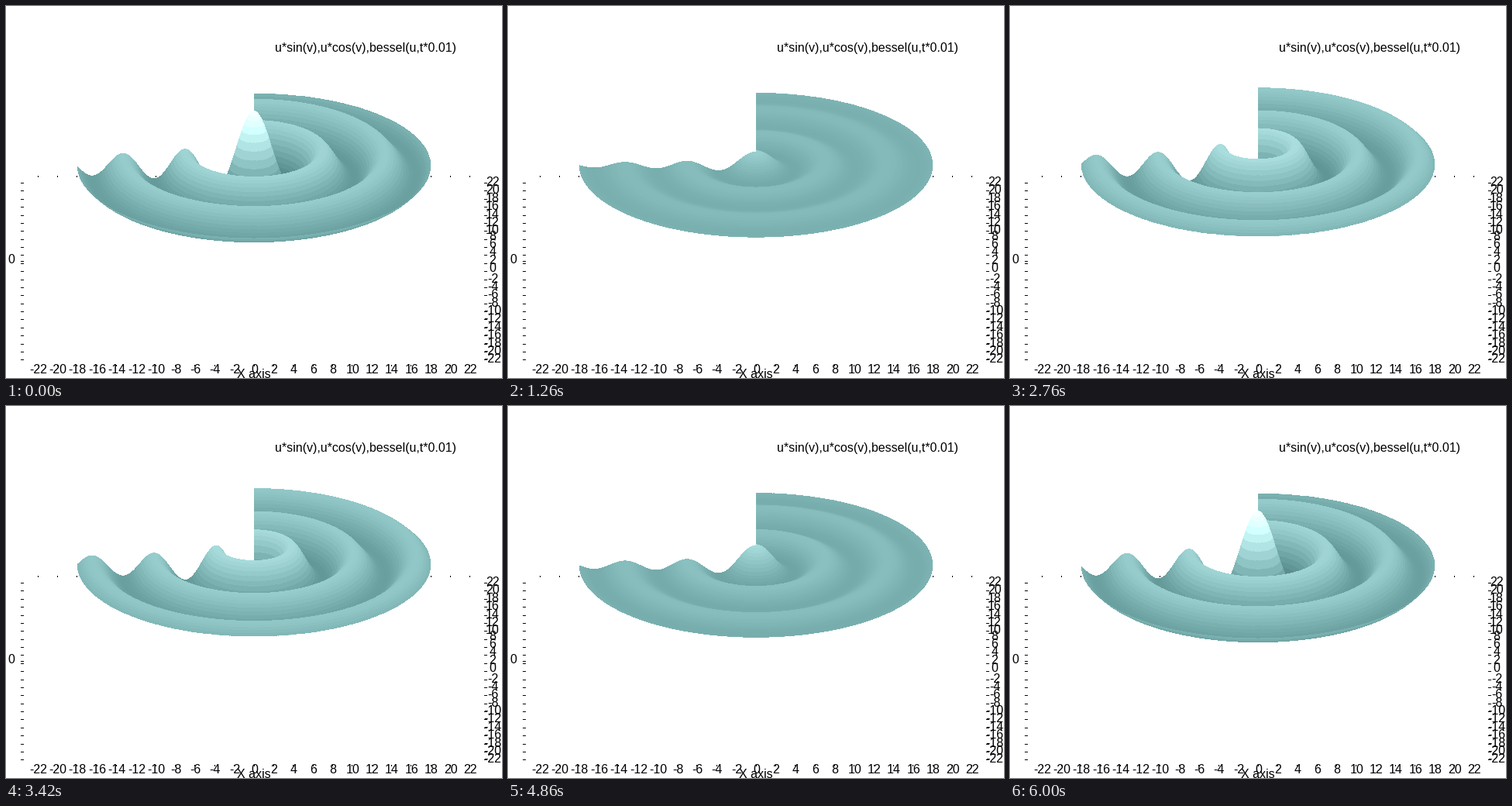
Recreate the animation shown at these times as a matplotlib script. Size 640 by 480 pixels, loop 6.06 s.

```python
import numpy as np
import matplotlib.pyplot as plt
from matplotlib.animation import FuncAnimation

W, H, DPI = 640, 480, 100
FRAMES, STEP_MS = 101, 60
CX, CY = 320, 205                # screen place of the surface's centre
SX, SY, SZ = 12.68, 5.19, 69.5   # pixels per unit along x, y and z
RADIUS, BANDS = 18, 72
FLOOR_Y = 342.2                  # screen height of y = 0 on the box floor
EDGE = 23.55                     # half width of the box
PX = 72 / DPI                    # one pixel in points

plt.rcParams["font.family"] = "Liberation Sans"
fig = plt.figure(figsize=(W / DPI, H / DPI), dpi=DPI, facecolor="white")
ax = fig.add_axes([0, 0, 1, 1])
ax.axis("off")


def bessel0(r):
    """J0 from its integral form."""
    a = (np.arange(200) + 0.5) * np.pi / 200
    return np.cos(np.multiply.outer(r, np.sin(a))).mean(axis=-1)


def label(x, y, text, ha="center"):
    ax.text(x, y, text, size=16 * PX, ha=ha, va="baseline", color="black", zorder=5)


def dash(x, y, w, h, zorder=4):
    """A small tick of w by h whole pixels, centred near (x, y)."""
    x0, y0 = np.round(x - w / 2), np.round(y) - h // 2
    ax.add_patch(plt.Rectangle((x0, y0), w, h, fc="black", lw=0,
                               antialiased=False, zorder=zorder))


# Axes
left, right = CX - SX * EDGE, CX + SX * EDGE
back, front = FLOOR_Y - SY * EDGE, FLOOR_Y + SY * EDGE
for m in range(-22, 23, 2):
    x, y = CX + SX * m, FLOOR_Y - SY * m
    dash(x, back, 1, 2, zorder=1)
    dash(x, front, 1, 2)
    dash(left, y, 4, 1)
    dash(right, y, 4, 1)
    lift = 3 if 0 <= m < 10 else 0
    label(x + 0.5, 474, str(m))
    label(628, np.round(y) + 4 - lift, str(m))
dash(left, 329, 4, 1)
label(6.5, 332, "0")
label(319.5, 480, "X axis")
label(347, 59, "u*sin(v),u*cos(v),bessel(u,t*0.01)", ha="left")

# Three quarters of a round membrane, sampled per pixel column, back to front
cols = np.arange(int(CX - SX * RADIUS), int(CX + SX * RADIUS) + 1)
gx = (cols + 0.5 - CX) / SX
gy = np.linspace(RADIUS, -RADIUS, 1801)[:, None]
r = np.hypot(gx, gy)
inside = (r <= RADIUS) & ((gx > 0) | (gy <= 0))
inside = inside[1:] & inside[:-1]

table = np.linspace(0, 26, 2601)
wave = np.interp(r, table, bessel0(table)).astype(np.float32)
flat = (CY - SY * gy - 0.5).astype(np.float32)
step = RADIUS / BANDS
band = np.minimum((r[1:] / step).astype(int), BANDS - 1)
band_wave = bessel0((np.arange(BANDS) + 0.5) * step)


def shade(z):
    red = 127 + 107 * z + 15 * z ** 2
    teal = 181 + 107 * z
    return np.clip(np.stack([red, teal, teal], axis=-1), 0, 255).astype(np.uint8)


picture = ax.imshow(np.zeros((H, W, 4), np.uint8), extent=(0, W, H, 0),
                    interpolation="nearest", aspect="auto", zorder=2)
ax.set_xlim(0, W)
ax.set_ylim(H, 0)


def update(i):
    swing = np.cos(2 * np.pi * i / (FRAMES - 1))
    rows = np.floor(flat - np.float32(SZ * swing) * wave).astype(np.int16)
    # a pixel is filled where the surface crosses its centre; nearer ones win
    crossed = inside & (rows[1:] != rows[:-1])
    k, c = np.nonzero(crossed)
    row = np.maximum(rows[k, c], rows[k + 1, c])
    image = np.zeros((H, W, 4), np.uint8)
    image[row, cols[c], :3] = shade(band_wave * swing)[band[k, c]]
    image[row, cols[c], 3] = 255
    picture.set_data(image)
    return (picture,)


anim = FuncAnimation(fig, update, frames=FRAMES, interval=STEP_MS,
                     init_func=lambda: update(0), repeat=True, repeat_delay=0)
plt.show()
```
